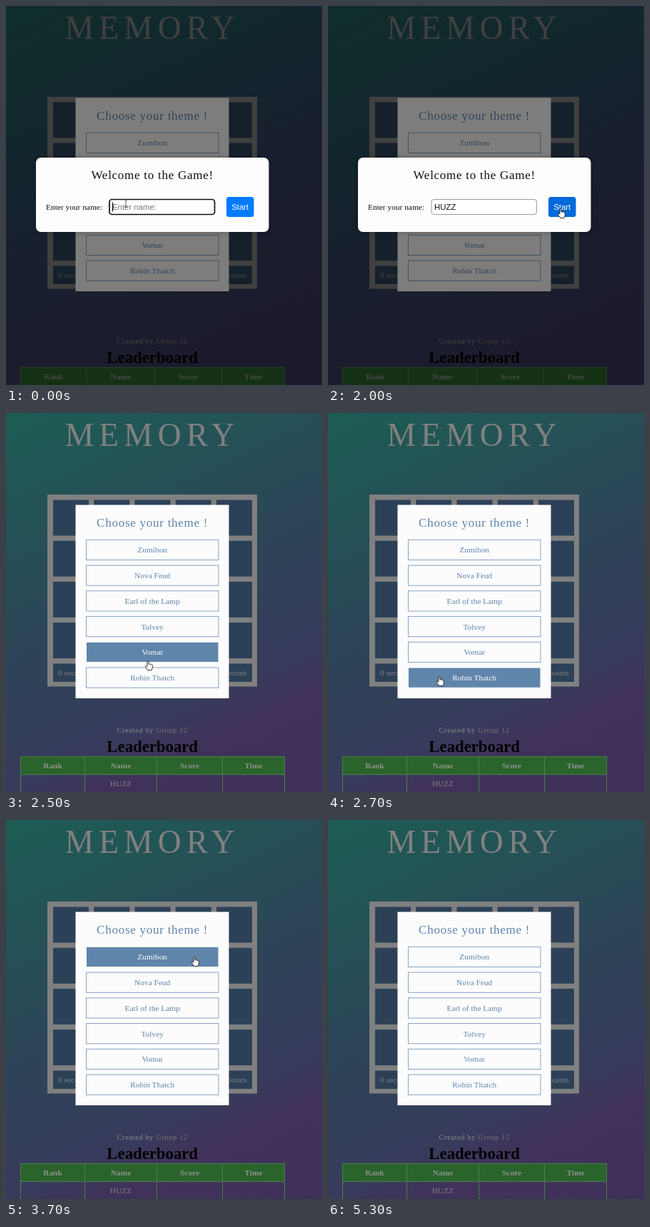
Write an HTML page that moves like this. It is 443 by 530 pixels and loops after 5400 ms.

```html
<!DOCTYPE html>
<html lang="en">
<head>
<meta charset="utf-8">
<title>Memory</title>
<style>
html, body { margin: 0; width: 100%; height: 100%; overflow: hidden; background: #1b1f2e; }
svg { display: block; width: 443px; height: 530px; }
text { font: 11.38px "Liberation Serif", "Times New Roman", serif; white-space: pre; }
.mid { text-anchor: middle; }
.bold { font-weight: bold; }
.sans { font-family: "Liberation Sans", Arial, sans-serif; }
.head { font-size: 17.07px; letter-spacing: .711px; }
.logo { font-size: 45.5px; letter-spacing: 7.11px; }
.made { font-size: 10.2px; letter-spacing: .711px; }
.board { font-size: 22.76px; }
</style>
</head>
<body>
<svg id="stage" viewBox="0 0 443 530">
  <defs>
    <linearGradient id="early" gradientUnits="userSpaceOnUse" x1="0" y1="0" x2="282" y2="605">
      <stop offset="0" stop-color="#1e5c55"/><stop offset=".25" stop-color="#23505a"/>
      <stop offset=".5" stop-color="#31405e"/><stop offset=".75" stop-color="#37385a"/>
      <stop offset="1" stop-color="#38365a"/>
    </linearGradient>
    <linearGradient id="late" gradientUnits="userSpaceOnUse" x1="0" y1="0" x2="282" y2="605">
      <stop offset="0" stop-color="#1c5d53"/><stop offset=".28" stop-color="#264f57"/>
      <stop offset=".5" stop-color="#2e4358"/><stop offset=".72" stop-color="#383b5c"/>
      <stop offset=".8" stop-color="#40325a"/><stop offset="1" stop-color="#3f3059"/>
    </linearGradient>
    <filter id="glow" x="-10%" y="-20%" width="120%" height="140%"><feGaussianBlur stdDeviation="3.5"/></filter>
  </defs>
</svg>
<script>
const LOOP = 5400, STEP = 100, START = 2100, GONE = 4800, CX = 205.2;
const NAME = 'HUZZ', KEYS = [500, 800, 1000, 1200], BLUR = 1900;
const THEMES = ['Zumibon', 'Nova Feud', 'Earl of the Lamp', 'Tolvey', 'Vomar', 'Robin Thatch'];
const BLUE = '#6085ab', GRAY = '#808080';
// time, x, y of the pointer tip
const PATH = [
  [0, 168, 276], [1200, 168, 276], [1700, 326, 283], [2000, 326, 283], [2100, 322, 284],
  [2700, 156, 368], [3000, 162, 366], [3700, 264, 191], [4300, 208, 238], [4400, 212, 234], [4700, 338, 11]
];

const stage = document.getElementById('stage');
function add(parent, tag, attrs, text) {
  const node = document.createElementNS('http://www.w3.org/2000/svg', tag);
  for (const k in attrs) node.setAttribute(k, attrs[k]);
  if (text) node.textContent = text;
  return parent.appendChild(node);
}
const group = (parent = stage) => add(parent, 'g', {});
const rect = (p, x, y, width, height, fill, more) => add(p, 'rect', { x, y, width, height, fill, ...more });
const label = (p, x, y, text, fill, cls = '') => add(p, 'text', { x, y, fill, class: cls }, text);
const show = (node, on) => node.setAttribute('display', on ? 'inline' : 'none');
const set = (node, attrs) => { for (const k in attrs) node.setAttribute(k, attrs[k]); };

const back = rect(stage, 0, 0, 443, 530, 'url(#early)');
label(stage, CX, 46, 'MEMORY', GRAY, 'mid logo');

// card grid
const grid = group();
rect(grid, 58, 114, 294, 268.5, GRAY);
for (let i = 0; i < 20; i++)
  rect(grid, 66 + (i % 5) * 57.25, 121.5 + Math.floor(i / 5) * 57.2, 50, 50, '#2c4157');
rect(grid, 66, 350.5, 279, 25.5, '#2c4157');
label(grid, 73, 366.5, '0 seconds', GRAY);
label(grid, 338, 366.5, '0 points', GRAY).setAttribute('text-anchor', 'end');

// footer and scores
const foot = group();
const made = label(foot, CX, 447, 'Created by ', '#8c8c8c', 'mid made');
add(made, 'tspan', { fill: '#777' }, 'Group 12');
label(foot, CX, 474, 'Leaderboard', '#000', 'mid bold board');
function table(cols, name) {
  const g = group(foot);
  const line = { stroke: '#4b7f4c', 'stroke-width': 1 };
  ['Rank', 'Name', 'Score', 'Time'].forEach((title, i) => {
    const x = cols[i], w = cols[i + 1] - x;
    rect(g, x, 480.5, w, 25, '#2a632b', line);
    label(g, x + w / 2, 496.5, title, '#8b938b', 'mid bold');
    if (name) rect(g, x, 505.5, w, 25.5, 'none', line);
  });
  if (name) label(g, (cols[1] + cols[2]) / 2, 522, name, GRAY, 'mid');
  return g;
}
const emptyTable = table([20.5, 112.5, 208.5, 302.5, 390.5]);
const fullTable = table([20.5, 110.5, 211.5, 303.5, 390.5], NAME);

// theme chooser
const chooser = group();
rect(chooser, 97.5, 128.5, 215, 270.5, '#fcfcfc');
label(chooser, CX, 158.5, 'Choose your theme !', BLUE, 'mid head');
const items = THEMES.map((name, i) => {
  const y = 177.3 + i * 35.75;
  return {
    y,
    box: rect(chooser, 112.5, y, 185.5, 28.2, '#fcfcfc', { stroke: '#86a3c6', 'stroke-width': 1 }),
    text: label(chooser, CX, y + 18, name, BLUE, 'mid')
  };
});

// welcome dialog
const dialog = group();
rect(dialog, 0, 0, 443, 530, '#000', { opacity: .5 });
rect(dialog, 42, 212, 326.5, 104, '#000', { rx: 7, opacity: .35, filter: 'url(#glow)' });
rect(dialog, 42, 212, 326.5, 104, '#fdfdfd', { rx: 7 });
label(dialog, CX, 242, 'Welcome to the Game!', '#111', 'mid head');
label(dialog, 56, 285, 'Enter your name:', '#111');
const field = rect(dialog, 145, 270.5, 147.5, 21, '#fff', { rx: 3.5 });
const typed = label(dialog, 149, 284.7, 'Enter name:', GRAY, 'sans');
const caret = rect(dialog, 149, 274.5, 1, 13, '#000');
const button = rect(dialog, 309, 267, 38.5, 28, '#007bff', { rx: 3.5 });
label(dialog, 328.2, 285, 'Start', '#fff', 'mid sans');

// pointers, drawn with the tip at the origin
const pointer = group();
const shape = (d, fill, stroke, w) => add(pointer, 'path', {
  d, fill, stroke, 'stroke-width': w, 'stroke-linejoin': 'round' });
const beam = shape('M-2 -5.5Q0 -5.5 0 -4Q0 -5.5 2 -5.5M0 -4V4M-2 5.5Q0 5.5 0 4Q0 5.5 2 5.5', 'none', '#444', .9);
const arrow = shape('M0 0V10L2.3 7.9L3.9 11.4L5.6 10.6L4 7.2H7Z', '#fff', '#111', .7);
const hand = shape('M-1 8V1Q0 -.6 1 1V5Q2 4 2.9 5.2Q4 4.3 4.7 5.7Q5.8 5 6.3 6.6V9.5Q6 11.5 5 13.5H-.5' +
  'Q-1.5 11.5 -3.2 9.4Q-4.3 7.6 -2.6 7.2Z', '#fff', '#111', .85);

function tipAt(t) {
  let i = 0;
  while (i < PATH.length - 2 && PATH[i + 1][0] <= t) i++;
  const [t0, x0, y0] = PATH[i], [t1, x1, y1] = PATH[i + 1];
  const u = Math.min(1, (t - t0) / (t1 - t0)), k = u * u * (3 - 2 * u);
  return [x0 + (x1 - x0) * k, y0 + (y1 - y0) * k];
}
const within = (x, y, l, t, r, b) => x >= l && x <= r && y >= t && y <= b;

function draw(t) {
  const playing = t >= START;
  const [x, y] = tipAt(t);
  const seen = t < GONE;

  back.setAttribute('fill', playing ? 'url(#late)' : 'url(#early)');
  grid.setAttribute('transform', `translate(0 ${playing ? 0 : 13})`);
  foot.setAttribute('transform', `translate(0 ${playing ? 0 : 25})`);
  show(emptyTable, !playing);
  show(fullTable, playing);
  show(dialog, !playing);

  const count = KEYS.filter(k => t >= k).length;
  const focus = t < BLUR;
  typed.textContent = count ? NAME.slice(0, count) : 'Enter name:';
  typed.setAttribute('fill', count ? '#111' : '#777');
  set(field, { stroke: focus ? '#111' : '#9a9aa2', 'stroke-width': focus ? 1.7 : 1 });
  caret.setAttribute('x', 149 + (count ? typed.getComputedTextLength() : 0));
  show(caret, focus && (t % 1000 < 500 || (count && count < 4)));

  const onStart = !playing && within(x, y, 309, 267, 347.5, 295);
  button.setAttribute('fill', onStart ? '#0069d9' : '#007bff');

  let onItem = false;
  for (const it of items) {
    const over = playing && seen && within(x, y, 112, it.y, 298, it.y + 28.2);
    onItem = onItem || over;
    set(it.box, { fill: over ? BLUE : '#fcfcfc', stroke: over ? '#fcfcfc' : '#86a3c6' });
    it.text.setAttribute('fill', over ? '#fff' : BLUE);
  }

  const onField = !playing && within(x, y, 144, 270, 293, 292);
  const press = onStart || onItem;
  pointer.setAttribute('transform', `translate(${x} ${y})`);
  show(pointer, seen);
  show(beam, onField);
  show(hand, press);
  show(arrow, !onField && !press);
}

const begin = performance.now();
function tick() {
  const t = (performance.now() - begin) % LOOP;
  draw(Math.floor(t / STEP) * STEP);
  requestAnimationFrame(tick);
}
tick();
</script>
</body>
</html>
```
